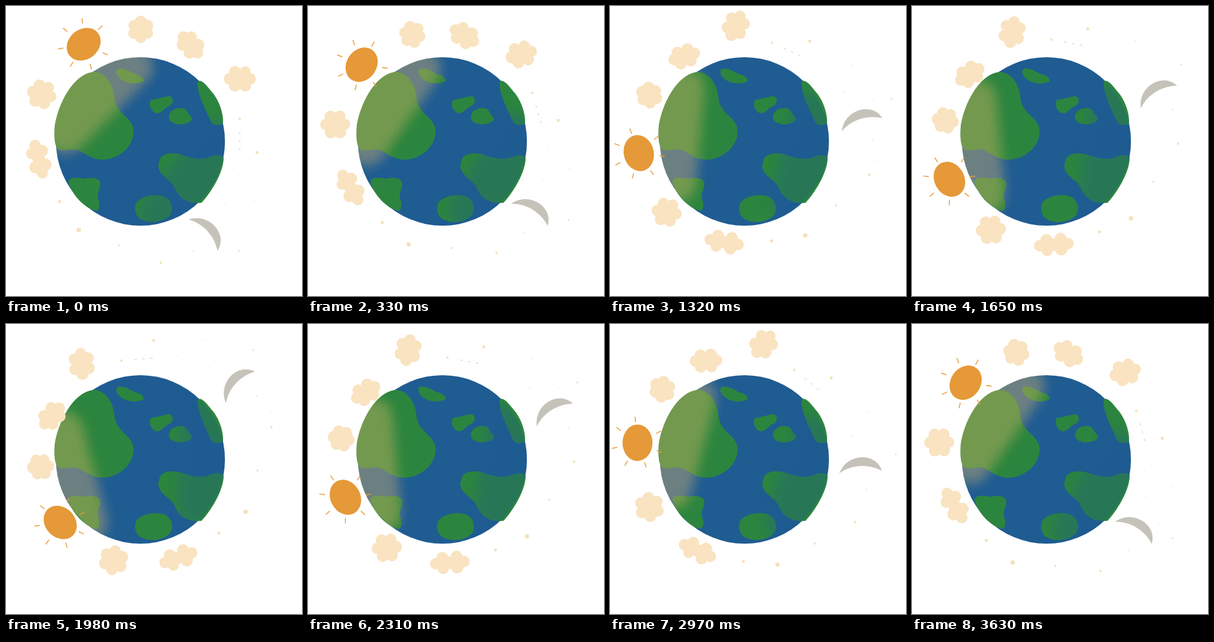
Animation, 480 px wide and 470 px high, one loop 3960 ms. Source, as an HTML page:

```html
<!DOCTYPE html>
<html lang="en">
<head>
<meta charset="utf-8">
<title>Day and night</title>
<style>
  html, body { margin: 0; width: 100%; height: 100%; overflow: hidden; background: #fff; }
  svg { display: block; width: 100%; height: 100%; }
</style>
</head>
<body>
<svg viewBox="0 0 480 470">
  <defs>
    <filter id="grain" x="-30%" y="-30%" width="160%" height="160%" color-interpolation-filters="sRGB">
      <feGaussianBlur in="SourceGraphic" stdDeviation="9" result="soft"/>
      <feTurbulence type="fractalNoise" baseFrequency=".8" numOctaves="2" seed="4"/>
      <feDisplacementMap in="soft" scale="18" xChannelSelector="R" yChannelSelector="G"/>
    </filter>
    <clipPath id="globe">
      <ellipse cx="218" cy="219.5" rx="137" ry="136.5"/>
      <use href="#west"/>
    </clipPath>
  </defs>

  <ellipse cx="218" cy="219.5" rx="137" ry="136.5" fill="#1f5c92"/>
  <g fill="#2c853e">
    <path id="west" d="M140 107C158 105 175 125 176 150C180 178 208 180 207 205C205 232 178 250 155 249C138 249 125 236 115 233C102 231 95 236 86 233C78 228 78 210 79 195C84 160 108 112 140 107Z"/>
    <path d="M181 102C192 100 200 106 208 110C218 112 224 117 223 122C214 127 200 126 192 122C183 118 175 108 181 102Z"/>
    <path d="M236 152C246 151 256 147 265 146C273 149 272 158 265 162C257 164 255 172 246 174C236 174 229 158 236 152Z"/>
    <path d="M265 176C268 166 284 162 292 168C295 174 299 178 302 182C300 190 290 191 282 192C270 191 262 186 265 176Z"/>
    <path d="M311 122C319 118 328 133 337 143C347 157 353 176 352 190C346 195 338 194 333 189C325 170 308 140 311 122Z"/>
    <path d="M250 247C256 238 272 237 285 241C300 247 318 250 330 245C340 241 350 240 353 247C352 275 326 310 317 319C296 322 280 311 274 296C268 280 246 276 247 257Z"/>
    <path d="M212 318C220 308 240 304 255 308C268 312 273 328 266 339C255 352 228 354 215 343C208 335 208 325 212 318Z"/>
    <path d="M101 285C105 275 118 279 128 280C140 276 153 280 153 288C153 297 147 303 149 312C153 320 152 330 147 332C129 329 107 307 101 285Z"/>
  </g>
  <g clip-path="url(#globe)">
    <g id="night"><rect x="62" y="-105" width="110" height="210" rx="30" fill="#1f5c92" opacity=".31" filter="url(#grain)"/></g>
    <g id="day"><rect x="-172" y="-108" width="110" height="216" rx="30" fill="#e4b969" opacity=".39" filter="url(#grain)"/></g>
  </g>

  <g id="sky">
    <g id="clouds" fill="#f9e3c1"></g>
    <g id="stars" fill="#f6dfbb"></g>
    <path d="M379 204V235" stroke="#c9c2b8" stroke-width=".8" stroke-dasharray="4 9"/>
    <g transform="translate(126 62)" fill="#e59938">
      <ellipse rx="29.5" ry="24.3" transform="rotate(-39)"/>
      <g id="rays" stroke="#e59938" stroke-width="1.4" stroke-linecap="round"></g>
    </g>
    <path d="M296 346C318 339 334 350 342 361C349 372 351 384 343 397C340 380 326 354 296 346Z" fill="#c5c2b9"/>
  </g>
</svg>
<script>
const STEP = 330, LAST = 6;
const $ = id => document.getElementById(id);
const times = (n, fn) => Array.from({ length: n }, (_, i) => fn(i)).join('');
const dot = (x, y, r) => `<circle cx="${x}" cy="${y}" r="${r}"/>`;

let seed = 11;
const random = () => (seed = seed * 16807 % 2147483647) / 2147483647;

// A cloud is a ring of six puffs around a filled oval.
function cloud(x, y, rx, ry, tilt) {
  const puffs = times(6, i => {
    const a = i * Math.PI / 3;
    return dot(rx * Math.cos(a), ry * Math.sin(a), 9 + random());
  });
  return `<g transform="translate(${x} ${y}) rotate(${tilt})"><ellipse rx="${rx}" ry="${ry}"/>${puffs}</g>`;
}
$('clouds').innerHTML =
  cloud(218.5, 38, 12.5, 12.5, 30) + cloud(299, 63, 17, 11, 48) + cloud(379.5, 118, 16.5, 13, 0) +
  cloud(58, 143, 15, 15, 15) + cloud(53, 248, 23, 10, 75);

// Main stars, then faint specks scattered along the moon's side of the orbit.
$('stars').innerHTML =
  dot(379, 183, 2) + dot(407, 237.5, 2.4) + dot(87, 317, 2.4) +
  dot(118, 363, 3.5) + dot(183, 388, 1.7) + dot(251, 416, 2) + dot(378, 397, 1.5) +
  times(7, i => {
    const a = .35 + i * .16, r = 165 + 45 * random();
    return dot(223 + r * Math.cos(a), 217 + r * Math.sin(a), .6 + .6 * random());
  });

$('rays').innerHTML = times(7, i => `<path d="M34 0H42" transform="rotate(${24 + i * 48.5})"/>`);

const move = (id, value) => $(id).setAttribute('transform', value);

let shown = -1;
function draw(ms) {
  const n = Math.floor(ms / STEP) % (LAST * 2);
  const pose = Math.min(n, LAST * 2 - n);
  if (pose === shown) return;
  shown = pose;

  // The sky swings back and forth, quickest midway, and drifts a little.
  const p = pose / LAST;
  const turn = -94.8 * p - 3.1 * Math.sin(Math.PI * p) ** 3;
  const x = 222.8 + 11.3 * p ** 2, y = 216.8 - 4.6 * p ** 3;
  move('sky', `translate(${x} ${y}) rotate(${turn}) translate(-222.8 -216.8)`);

  // Light and shade trail behind it on the globe.
  move('day', `translate(218 219.5) rotate(${45 - 60 * p}) translate(${-15 * p} 0)`);
  move('night', `translate(218 219.5) rotate(${37 - 36 * p})`);
}

const start = performance.now();
function tick() {
  draw(performance.now() - start);
  requestAnimationFrame(tick);
}
tick();
</script>
</body>
</html>
```
